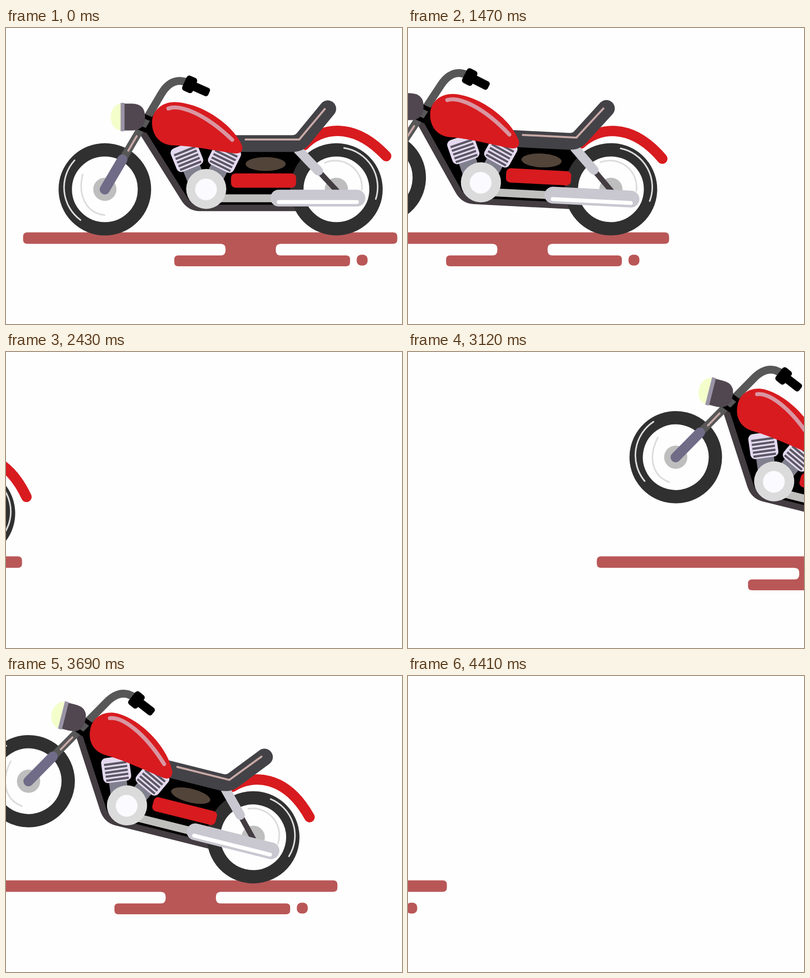
Recreate the animation shown at these times as an HTML page. Size 800 px wide and 600 px high, loop 4440 ms.

```html
<!DOCTYPE html>
<html lang="en">
<head>
<meta charset="utf-8">
<title>Motorcycle</title>
<style>
html, body { margin: 0; width: 100%; height: 100%; overflow: hidden; background: #fefefe; }
svg { display: block; }
.line { fill: none; }
.round { fill: none; stroke-linecap: round; }
.shine { fill: none; stroke: #dcdcdc; stroke-width: 3.2; stroke-linecap: round; }
</style>
</head>
<body>
<svg width="800" height="600" viewBox="0 0 800 600">
  <defs>
    <g id="wheel">
      <circle r="80" fill="#fefefe" stroke="#303030" stroke-width="27"/>
      <circle r="23.5" fill="#bebebe"/>
    </g>
    <g id="cylinder">
      <path class="line" d="M0 18V62" stroke="#80808e" stroke-width="36"/>
      <rect x="-28.5" y="-25.5" width="57" height="51" rx="10" fill="#e4d9ef"/>
      <path class="line" d="M-23-12H23M-23-4H23M-23 4H23M-23 12H23M-23 20H23" stroke="#5b5764" stroke-width="4.5"/>
    </g>
  </defs>

  <g id="ground" fill="#b95757">
    <path d="M43 414.2H782q8.5 0 8.5 8.5v6.3q0 8.5-8.5 8.5H555q-10 0-10 10v3.5q0 10 10 10H687q8 0 8 8v6q0 8-8 8H348q-8 0-8-8v-6q0-8 8-8h85.5q10 0 10-10v-3.5q0-10-10-10H43q-8.500 0-8.500-8.500v-6.300q0-8.500 8.500-8.500z"/>
    <rect x="708.5" y="459.5" width="22" height="22" rx="9"/>
  </g>

  <g id="bike">
    <!-- rear fender and frame -->
    <path class="round" d="M602 238C634 204 700 187 768 260" stroke="#d81b1f" stroke-width="21"/>
    <path d="M276 212L359 345Q371 365 392 365H600V262L590 240H480L300 170z"/>
    <path class="line" d="M276 212L359 345Q371 365 392 365H600" stroke="#433c41" stroke-width="13"/>

    <!-- rear wheel -->
    <use href="#wheel" x="667.5" y="327.2"/>
    <path class="shine" d="M683 243.5A80 80 0 0 1 747 347M644 273.5A54 54 0 0 1 719 328"/>

    <ellipse cx="524.5" cy="276" rx="40.5" ry="14" fill="#524439"/>
    <rect x="454.5" y="295" width="131.5" height="29" rx="9" fill="#d81b1f"/>
    <rect x="420" y="337.5" width="130" height="16" fill="#bfbfbd"/>

    <!-- shock absorber, seat, exhaust -->
    <path class="line" d="M625 283.6L677 339.5" stroke="#433c41" stroke-width="11"/>
    <path class="round" d="M590 247L631 290" stroke="#c9c7d0" stroke-width="19"/>
    <path class="round" d="M455 234.5H578Q592 234.5 600 225L650 164" stroke="#434247" stroke-width="34"/>
    <path class="round" d="M484 226.2H592.5L644 164.5" stroke="#c8a9a6" stroke-width="4"/>
    <rect x="534" y="328" width="192" height="34" rx="17" fill="#c9c7d0"/>
    <rect x="547" y="349" width="166" height="8" rx="4" fill="#fefefe"/>

    <!-- engine -->
    <use href="#cylinder" transform="translate(365.5 261) rotate(-22)"/>
    <use href="#cylinder" transform="translate(441.5 262) rotate(26)"/>
    <circle cx="404.5" cy="326.5" r="40.5" fill="#dbdbdb"/>
    <circle cx="404" cy="327.5" r="22" fill="#fafaff"/>

    <!-- front wheel -->
    <use href="#wheel" x="199.7" y="327.3"/>
    <path class="shine" d="M138.5 268.5A82 82 0 0 0 150.5 389.5M155 297C145 337 160 375 199 379.5"/>

    <!-- handlebar and fork -->
    <path class="line" d="M222 290L313 135Q329 107 352 107.5L368 110" stroke="#575757" stroke-width="16"/>
    <path class="line" d="M277 178L298 187M268 202L286 209" stroke="#000" stroke-width="9"/>
    <path class="round" d="M247 249L264 219.5" stroke="#c8a9a6" stroke-width="4"/>
    <path class="round" d="M199.5 327.5L235 267" stroke="#706b87" stroke-width="20.5"/>
    <rect x="-11.5" y="-16.5" width="23" height="33" rx="6" transform="translate(371 114.5) rotate(24)"/>
    <rect x="-21" y="-9" width="42" height="18" rx="5" transform="translate(391 123.5) rotate(24)"/>

    <!-- tank -->
    <path d="M341 150.5C398 152 462 200 477 239C479 250 474 255 463 254.5C420 249 380 239 335 238C310 236 295 217 295 192C295 168 315 150 341 150.5z" fill="#d81b1f"/>
    <path class="round" d="M328 163.5C350 155 400 172 457 227" stroke="#d996a2" stroke-width="8"/>

    <!-- headlight -->
    <ellipse cx="232" cy="181" rx="20.5" ry="27" fill="#f3fecb"/>
    <path d="M239 153.5h15q27 0 27 27t-27 27.5h-15z" fill="#504750"/>
    <rect x="231.5" y="152" width="8" height="57.5" fill="#9a93a6"/>
  </g>
</svg>
<script>
const LOOP = 4440, STEP = 30;
const START = 960, LIFT = 1282, RETURN = 2565;
const ground = document.getElementById('ground');
const bike = document.getElementById('bike');

function pose(t) {
  if (t < RETURN) {
    // ride off to the left while the front wheel lifts
    const run = Math.max(0, t - START);
    return { groundX: -0.5157 * run, bikeX: -0.505 * run, angle: Math.max(0, t - LIFT) * 0.01553 };
  }
  // cross the stage from the right on the rear wheel
  return { groundX: 800 - 0.8208 * (t - 2568), bikeX: 800 - 0.869 * (t - 2576), angle: 14.07 };
}

function draw(now) {
  const t = Math.floor(now % LOOP / STEP) * STEP;
  const { groundX, bikeX, angle } = pose(t);
  ground.setAttribute('transform', `translate(${groundX} 0)`);
  bike.setAttribute('transform', `translate(${bikeX} -0.3) rotate(${angle} 667.5 327)`);
}

const begin = performance.now();
function tick() {
  draw(performance.now() - begin);
  requestAnimationFrame(tick);
}
tick();
</script>
</body>
</html>
```
